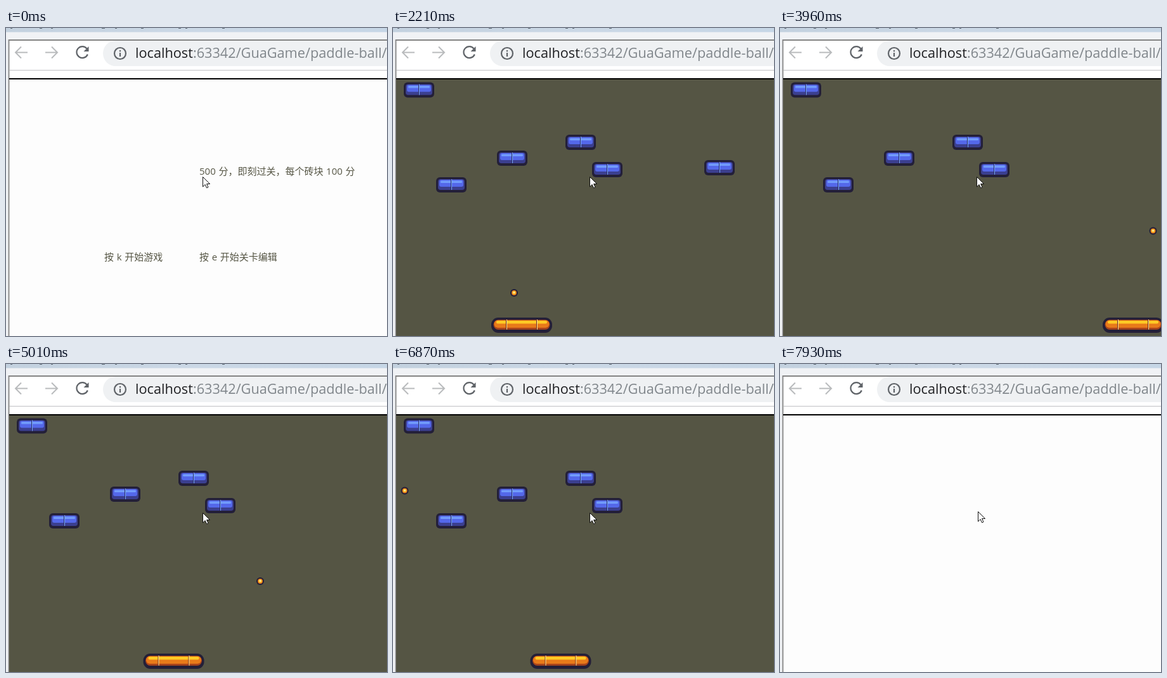
An HTML page that plays this animation: 601x485 px, repeating every 8000 ms.

```html
<!DOCTYPE html>
<html lang="zh">
<head>
<meta charset="utf-8">
<style>
html, body { margin: 0; width: 100%; height: 100%; overflow: hidden; background: #fff; }
svg { display: block; }
.url { font: 21.7px "Open Sans", sans-serif; fill: #80868b; }
.title { font: 15px "Open Sans", "Noto Sans CJK SC", "Noto Sans CJK", sans-serif; word-spacing: .8px; fill: #554; }
.icon { fill: none; stroke: #5f6368; stroke-width: 2.2; }
</style>
</head>
<body>
<svg width="601" height="485" viewBox="0 0 601 485">
  <defs>
    <linearGradient id="strip"><stop stop-color="#c3d1df"/><stop offset=".5" stop-color="#cbd8e6"/><stop offset="1" stop-color="#c6d6e6"/></linearGradient>
    <clipPath id="field"><rect x="5" y="81" width="596" height="404"/></clipPath>
    <g id="brick">
      <rect width="48" height="24" rx="6" fill="#231f38"/>
      <rect x="3" y="3" width="42" height="17" rx="4" fill="#3b3f8f"/>
      <rect x="5" y="4" width="38" height="11" rx="3" fill="#5468ea"/>
      <rect x="7" y="5.500" width="34" height="3.500" rx="1.500" fill="#729cfc"/>
      <path d="M23.5 3v17" stroke="#2c2d66"/>
      <path d="M24.5 3v17" stroke="#78a8f8"/>
    </g>
    <g id="bar">
      <rect width="96" height="24" rx="11" fill="#231f38"/>
      <rect x="3.500" y="3.500" width="89" height="15.500" rx="7.500" fill="#a8441c"/>
      <rect x="4.500" y="4" width="87" height="12" rx="6" fill="#e87a1a"/>
      <rect x="8" y="5" width="80" height="4.500" rx="2" fill="#ffcb25"/>
      <path d="M23.5 3v16M71.5 3v16" stroke="#6b2c20"/>
      <path d="M24.5 3v16M72.5 3v16" stroke="#ffdf90"/>
    </g>
  </defs>

  <rect width="601" height="485" fill="#f0f2f5"/>
  <rect width="601" height="6.5" fill="url(#strip)"/>
  <path d="M7 .5h3M53 .5h4M71 .5h3M151 .5h5M172 .5h3M213 .5h4M272 .5h4M283 .5h3M341 .5h4" stroke="#5b6670"/>
  <rect x="4" y="19" width="597" height="466" fill="#fff"/>
  <rect x="5" y="81" width="596" height="404" fill="#fdfdfd"/>
  <path d="M601 20H173a20 20 0 0 0 0 40H601z" fill="#eff1f3"/>
  <path d="M601 19H4.500V485" fill="none" stroke="#848484" stroke-width="1.800"/>
  <path d="M5 66.5H601" stroke="#c0c1c3"/>
  <g class="icon">
    <path d="M34 38.5H15M24 29.5l-9 9 9 9M62 38.5H81M72 29.5l9 9-9 9" stroke="#b9bbbd" stroke-width="2"/>
    <path d="M127.5 32.5a9 9 0 1 0 1.3 9"/>
    <path d="M130.5 29v8h-8z" fill="#5f6368" stroke="none"/>
    <circle cx="180" cy="40" r="9"/>
    <path d="M180 39v6M180 35v2.2"/>
  </g>
  <text class="url" x="204" y="47"><tspan fill="#202124">localhost</tspan>:63342/GuaGame/paddle-ball/</text>

  <g id="menu" class="title">
    <text x="305" y="231">500 分，即刻过关，每个砖块 100 分</text>
    <text x="155" y="366">按 k 开始游戏</text>
    <text x="305" y="366">按 e 开始关卡编辑</text>
  </g>

  <g id="game" clip-path="url(#field)">
    <rect x="5" y="81" width="596" height="404" fill="#554"/>
    <use href="#brick" x="17" y="85.5"/>
    <use href="#brick" x="164" y="193"/>
    <use href="#brick" x="272" y="168"/>
    <use href="#brick" x="314" y="211"/>
    <use href="#brick" x="68" y="235"/>
    <use href="#brick" x="491" y="208" id="target"/>
    <use href="#bar" y="456" id="paddle"/>
    <g id="ball">
      <circle cx="6" cy="6" r="6" fill="#231f38"/>
      <circle cx="6" cy="6" r="4" fill="#dd701c"/>
      <circle cx="6" cy="5.7" r="2.8" fill="#ffc02c"/>
      <circle cx="6" cy="5.5" r="1.3" fill="#fff1b0"/>
    </g>
  </g>
  <path d="M5 80H601" stroke="#000" stroke-width="2"/>
  <path id="cursor" d="M.5.5v15.5l3.6-3.5 2.5 5.3 2.4-1.1-2.4-5.2h5z" fill="#fff" stroke="#111"/>
</svg>
<script>
const LOOP = 8000, START = 590, END = 7930, SPEED = 7.5;
const BRICK_HIT = 42, CURSOR_NUDGE = 37;
const $ = id => document.getElementById(id);

// The screen refreshes in steps, a little faster while a key is held.
const stepAt = [[2210, 0], [3330, 8], [3810, 12], [4650, 18], [5010, 21], [7180, 36], [7930, 42]];
const tickAt = [[0, 4], [8, 38], [12, 53], [18, 78], [21, 90], [36, 154], [42, 178]];
const paddleAt = [[0, 155], [4, 357.5], [8, 357.5], [12, 470], [13, 509], [16, 509], [17, 486.5],
  [21, 216.5], [33, 216.5], [34, 284], [35, 306.5], [36, 306.5], [38, 284]];

// Linear interpolation through key points, held at both ends
function along(keys, x) {
  const i = keys.findIndex(k => k[0] > x);
  if (i === 0) return keys[0][1];
  if (i < 0) return keys[keys.length - 1][1];
  const [x0, y0] = keys[i - 1], [x1, y1] = keys[i];
  return y0 + (y1 - y0) * (x - x0) / (x1 - x0);
}

// Travel back and forth between two walls
function bounce(pos, low, high) {
  const span = high - low;
  const u = (pos - low) % (2 * span);
  return low + (u > span ? 2 * span - u : u);
}

const ballX = tick => bounce(155 + SPEED * tick, -2.5, 612.5);

// Paddle, brick, paddle, ceiling: each turns the ball vertically
const turns = [9, BRICK_HIT, 75, 125];
const ballY = tick => turns.reduce(
  (y, turn, i) => y + (i % 2 ? 2 : -2) * SPEED * Math.max(0, tick - turn),
  381 + SPEED * tick);

const show = (id, on) => $(id).style.display = on ? '' : 'none';
const move = (id, x, y) => $(id).setAttribute('transform', `translate(${x} ${y})`);

function draw(t) {
  const step = Math.floor(along(stepAt, t) + .08);
  const tick = t < stepAt[0][0] ? 0 : Math.floor(along(tickAt, step) + .75);
  const nudge = step < CURSOR_NUDGE ? 0 : 2;
  show('menu', t < START);
  show('game', t >= START && t < END);
  show('target', tick < BRICK_HIT);
  $('paddle').setAttribute('x', along(paddleAt, step));
  move('ball', ballX(tick), ballY(tick));
  move('cursor', 310 + nudge, 234 - nudge);
}

const begin = performance.now();
function frame() {
  draw((performance.now() - begin) % LOOP);
  requestAnimationFrame(frame);
}
frame();
</script>
</body>
</html>
```
